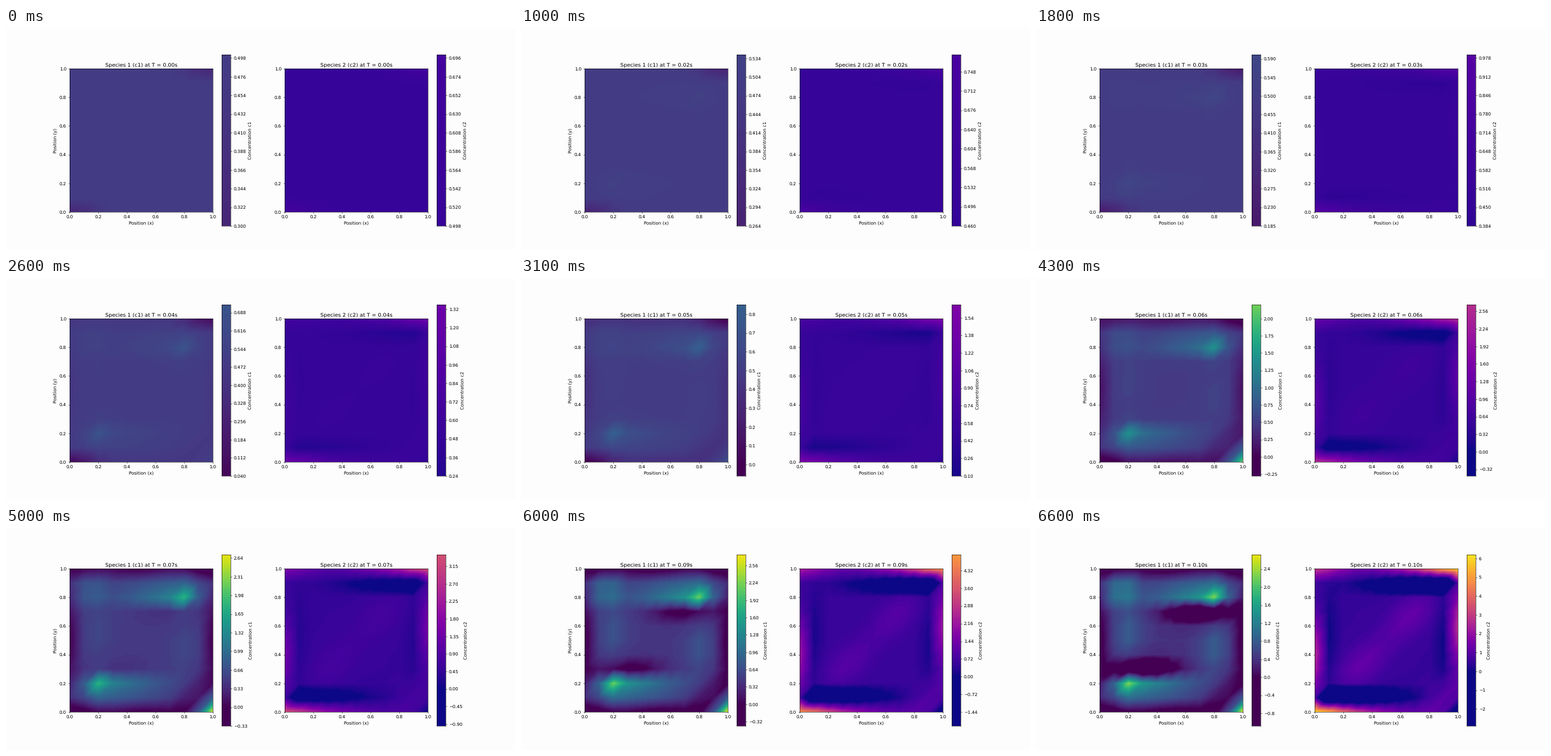
A matplotlib script for the animation above (6.7 s loop, 800 px wide and 350 px high).

```python
import numpy as np
import matplotlib.pyplot as plt
from matplotlib.animation import FuncAnimation
from matplotlib.ticker import FixedLocator, MaxNLocator

plt.rcParams["text.hinting"] = "none"

W, H, DPI = 800, 350, 50
FRAMES, STEP, DT = 67, 15, 0.0001
BG = "#fefdfe"

NODES = np.linspace(0, 1, 11)
X, Y = np.meshgrid(NODES, NODES)
FRAME = np.arange(FRAMES)
U = FRAME / (FRAMES - 1)


# Growth over the loop, one value per frame
def power(p):
    return U ** p


def logistic(mid, width):
    s = 1 / (1 + np.exp((mid - FRAME) / width))
    return (s - s[0]) / (1 - s[0])


# Shapes on the mesh nodes
def fall(d, w):
    """Gaussian falloff; w may be a (below, above) pair of widths."""
    lo, hi = w if isinstance(w, tuple) else (w, w)
    return np.exp(-(d / np.where(d < 0, lo, hi)) ** 2)


def bump(x, y, wx, wy):
    return fall(X - x, wx) * fall(Y - y, wy)


def streak(x, y, across, along):
    """A bump stretched along the rising diagonal."""
    return fall(X - Y - (x - y), across) * fall(X + Y - (x + y), along)


def twin(shape):
    """Add the point reflection about the centre."""
    return shape + shape[::-1, ::-1]


def evolve(base, *parts):
    return base + sum(np.multiply.outer(g, s) for g, s in parts)


corner = twin(bump(0, 0, 0.18, 0.05))
far_corner = bump(0, 1, 0.22, 0.06)
band = streak(0.9, 0.1, 0.14, 0.25)

drain = logistic(40, 6)
ridge = logistic(44, 8)
peak = twin(bump(0.2, 0.2, 0.07, 0.07))

species1 = evolve(
    0.5005,
    (-0.1 * power(3), np.ones_like(X)),
    (1.1 * ridge, twin(bump(0.2, 0.2, (0.1, 0.42), (0.12, 0.07)))),
    (0.75 * ridge + 0.13 * power(1), peak),
    (0.45 * power(4), twin(bump(0.2, 0.55, 0.1, 0.16))),
    (0.9 * power(3), bump(0.15, 0.85, 0.1, 0.1)),
    (-0.2 - 0.49 * logistic(26, 7), corner),
    (-0.65 * drain, twin(bump(0.5, 0, 0.35, 0.05))),
    (-0.6 * drain, twin(bump(0, 0.5, 0.05, 0.3))),
    (-0.5 * drain, far_corner),
    (-1.6 * power(8), twin(bump(0.3, 0.3, 0.22, (0.03, 0.06)))),
    (-0.6 * drain, band),
    (2.5 * logistic(39.5, 3.5), bump(1, 0, 0.09, 0.09)),
)

species2 = evolve(
    0.4995,
    (0.2 + 1.5 * power(2.2) + 0.4 * power(12), twin(bump(0, 0, 0.18, 0.045))),
    (3.4 * power(2.2), twin(bump(0, 0, 0.5, 0.045))),
    (2.2 * power(3), twin(bump(0, 0.4, 0.06, 0.25))),
    (2.4 * power(3), far_corner),
    (-0.2 * power(1) - 2.85 * power(3) - 0.3 * power(12),
     twin(bump(0.1, 0.1, (0.06, 0.44), (0.04, 0.05)))),
    (-0.6 * power(3), twin(bump(0.1, 0.5, 0.05, 0.35))),
    (0.75 * power(4), twin(streak(0.33, 0.33, 0.16, 0.3))),
    (0.8 * power(3), band),
    (-1.5 * power(3), bump(1, 0, 0.05, 0.05)),
)

# Linear interpolation on triangles split along the rising diagonal
N = 226
g = (np.arange(N) + 0.5) / N * 10
CELL = g.astype(int)
FX, FY = np.meshgrid(g - CELL, g - CELL)
COL, ROW = np.meshgrid(CELL, CELL)


def refine(z):
    z00, z11 = z[ROW, COL], z[ROW + 1, COL + 1]
    z10, z01 = z[ROW, COL + 1], z[ROW + 1, COL]
    lower = z00 + FX * (z10 - z00) + FY * (z11 - z10)
    upper = z00 + FY * (z01 - z00) + FX * (z11 - z01)
    return np.where(FX >= FY, lower, upper)


def contour_levels(z):
    lo, hi = z.min(), z.max()
    lev = MaxNLocator(101, min_n_ticks=1).tick_values(lo, hi)
    under, over = np.flatnonzero(lev < lo), np.flatnonzero(lev > hi)
    first = under[-1] if len(under) else 0
    last = over[0] + 1 if len(over) else len(lev)
    return lev[first:last]


fig = plt.figure(figsize=(W / DPI, H / DPI), dpi=DPI, facecolor=BG)


def add_box(x, y, w, h):
    """Axes with every edge on a whole pixel."""
    x0, y0, x1, y1 = np.floor(np.round(np.array([x, y, x + w, y + h]) * 2) / 2)
    return fig.add_axes([x0 / W, y0 / H, (x1 - x0) / W, (y1 - y0) / H], facecolor=BG)


class Panel:
    def __init__(self, num, data, cmap, vmax):
        self.num, self.data = num, data
        slot = 620 / 2.2
        x0 = 100 + (num - 1) * slot * 1.2
        side, bar_y, bar_h = slot * 0.8, 0.11 * H, 0.77 * H
        self.ax = add_box(x0, bar_y + (bar_h - side) / 2, side, side)
        self.cax = add_box(x0 + slot * 0.85, bar_y, bar_h / 20, bar_h)
        style = dict(origin="lower", aspect="auto", cmap=cmap, vmin=0, vmax=vmax,
                     interpolation="nearest")
        self.img = self.ax.imshow(np.zeros((N, N)), extent=(0, 1, 0, 1), **style)
        self.bar = self.cax.imshow(np.zeros((2, 1)), extent=(0, 1, 0, 1), **style)
        self.ax.set_xlabel("Position (x)")
        if num == 1:
            self.ax.set_ylabel("Position (y)")
        self.cax.set_xticks([])
        self.cax.yaxis.tick_right()
        self.cax.yaxis.set_label_position("right")
        self.cax.set_ylabel(f"Concentration c{num}")

    def show(self, k):
        z = self.data[k]
        lev = contour_levels(z)
        mid = (lev[:-1] + lev[1:]) / 2
        layer = np.searchsorted(lev, refine(z), side="right") - 1
        self.img.set_data(mid[np.clip(layer, 0, len(mid) - 1)])
        self.bar.set_data(mid[:, None])
        self.bar.set_extent((0, 1, lev[0], lev[-1]))
        self.cax.set_ylim(lev[0], lev[-1])
        self.cax.yaxis.set_major_locator(FixedLocator(lev, nbins=10))
        time = k * STEP * DT
        self.ax.set_title(f"Species {self.num} (c{self.num}) at T = {time:.2f}s")


panels = [Panel(1, species1, "viridis", 2.8), Panel(2, species2, "plasma", 6.5)]


def update(k):
    for p in panels:
        p.show(k)
    return []


anim = FuncAnimation(fig, update, frames=FRAMES, interval=100, repeat=True,
                     repeat_delay=0, blit=False)
plt.show()
```
